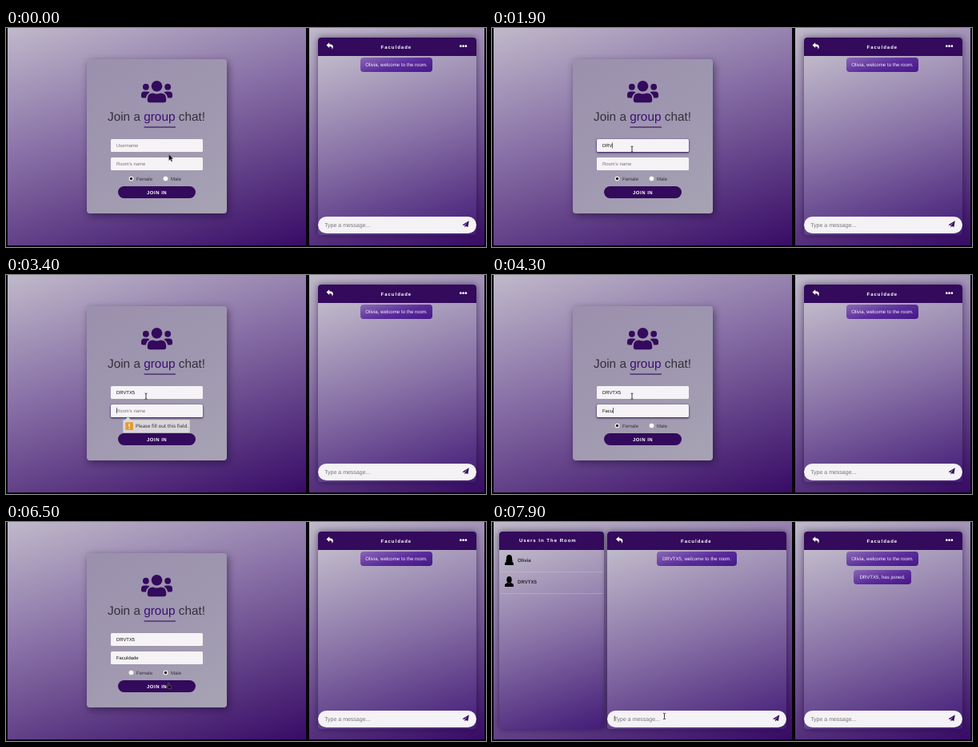
Write an HTML page that moves like this. It is 600 by 274 pixels and loops after 8000 ms.

```html
<!DOCTYPE html>
<html lang="en">
<head>
<meta charset="utf-8">
<title>Group chat</title>
<style>
  html, body { margin: 0; width: 100%; height: 100%; overflow: hidden; background: #08060b; }
  #stage { position: absolute; left: 0; top: 0; width: 600px; height: 274px; overflow: hidden; background: #08060b; }
  #stage div, svg { position: absolute; }
  .page { overflow: hidden; background: linear-gradient(162deg, #c0b9ca 0%, #8870a6 42%, #380b66 100%); }
  .card { border-radius: 4px; background: linear-gradient(150deg, #9b90ad, #9f97b0 50%, #a7a3b3); box-shadow: 2px 3px 10px rgba(20, 5, 40, .5); }
  .panel { border-radius: 4px; background: linear-gradient(162deg, #c9c5d0, #8871a6 52%, #431c77); box-shadow: 0 0 9px rgba(15, 0, 35, .55); }
  .head { border-radius: 4px 4px 0 0; background: #330a5c; }
  .field { border-radius: 1.5px; background: #f5f3f5; }
  .field.focus { box-shadow: 0 1px 2.5px #2b0a55, 0 0 1px #4a2a78; }
  .button { border-radius: 8px; background: #330a5c; }
  .pill { border-radius: 10.5px; background: #f4f2f4; }
  .bubble { border-radius: 4px; background: linear-gradient(165deg, #8a68b4, #5a2b9b 55%, #451787); }
  .line { background: rgba(205, 195, 215, .4); }
  .status { border-radius: 0 2px 0 0; background: #39343d; }
  svg { left: 0; top: 0; }
  text { font-family: "Liberation Sans", Arial, sans-serif; text-rendering: geometricPrecision; white-space: pre; }
  .title { font-size: 15.35px; fill: #35303a; }
  .small { font-size: 5.9px; fill: #77727c; }
  .typed { font-size: 5.9px; fill: #111; }
  .label { font-size: 6px; fill: #35303c; }
  .bold { font-size: 6px; font-weight: bold; fill: #fff; letter-spacing: 1px; }
  .join { letter-spacing: .5px; }
  .user { font-size: 6.1px; font-weight: bold; fill: #2c2633; }
  .hint { font-size: 7px; fill: #77727c; }
  .msg { font-size: 6.15px; fill: #f6f2fa; text-anchor: middle; }
  .system { font-family: "Noto Sans", "Open Sans", sans-serif; }
  .ink { fill: #330a5c; }
</style>
</head>
<body>
<div id="stage"></div>
<script>
(() => {
const LOOP = 8000;
const NAME = 'DRVTX5', FRIEND = 'Olivia', ROOM = 'Faculdade';
const stage = document.getElementById('stage');

function layer(x = 0, y = 0, w = 600, h = 274, cls = '', parent = stage) {
  const el = document.createElement('div');
  el.className = cls;
  el.style.cssText = `left:${x}px;top:${y}px;width:${w}px;height:${h}px`;
  return parent.appendChild(el);
}

const group = (parent = stage) => layer(0, 0, 600, 274, '', parent);

function draw(parent, markup) {
  parent.insertAdjacentHTML('beforeend', `<svg width="600" height="274" viewBox="0 0 600 274">${markup}</svg>`);
  return parent.lastElementChild;
}

const text = (x, y, cls, str, id = '') => `<text x="${x}" y="${y}" class="${cls}" data-id="${id}">${str}</text>`;
const at = (x, y, body, scale = 1) => `<g transform="translate(${x} ${y}) scale(${scale})">${body}</g>`;
const part = (svg, id) => svg.querySelector(`[data-id="${id}"]`);
const show = (el, on) => { el.style.display = on ? '' : 'none'; };

const REPLY = '<path fill="#fff" d="M0 3.6L4 0V2Q9.6 2 9 6.5Q8.8 8.3 7.6 9.2Q8.6 5.4 4 5.2V7.2Z"/>';
const PLANE = '<path class="ink" d="M0 5.4L9 0L7.5 8.4L4.6 7.2L3.2 9V6.5L7.2 2.2L2.3 6.3Z"/>';
const SIDE = '<circle cx="96" cy="160" r="64"/><path d="M64 256H128Q154 256 173 275Q108 312 98 384H32Q0 384 0 352V320Q0 256 64 256Z"/>';
const USERS = `<g class="ink">${SIDE}<g transform="translate(640 0) scale(-1 1)">${SIDE}</g>
  <circle cx="320" cy="144" r="112"/>
  <path d="M243 288Q320 320 397 288Q512 290 512 403V432Q512 480 464 480H176Q128 480 128 432V403Q128 290 243 288Z"/></g>`;
const BODY = '<path d="M0 13V11Q0 8.8 4 8L5.5 9L7 8Q11 8.8 11 11V13Z"/>';
const WOMAN = BODY + '<path d="M5.5 0Q9 0 9 4Q9 7 10 8.3Q5.5 9.8 1 8.3Q2 7 2 4Q2 0 5.5 0Z"/>';
const MAN = BODY + '<ellipse cx="5.5" cy="4.2" rx="3.2" ry="4.2"/>';

function chat(parent, x, w) {
  layer(x, 12, w, 247, 'panel', parent);
  layer(x, 12, w, 22.5, 'head', parent);
  layer(x, 236, w, 20.5, 'pill', parent);
  draw(parent, at(x + 11, 18.3, REPLY, .92) + at(x + w - 17, 241.3, PLANE, .92) +
    text(x + w / 2 - 20, 25.5, 'bold', ROOM) + text(x + 8.7, 248.6, 'hint', 'Type a message...'));
}

function bubble(parent, cx, y, w, str) {
  const holder = group(parent);
  layer(cx - w / 2, y, w, 18, 'bubble', holder);
  draw(holder, text(cx, y + 11, 'msg', str));
  return holder;
}

// Sign-in page
layer(2, 0, 373, 272, 'page');
const login = group();
layer(101, 39, 175, 193, 'card', login);
const fields = [139, 161.5].map(y => layer(131, y, 114.5, 16, 'field', login));
layer(140, 198, 97, 14.5, 'button', login);
const radio = cx => `<circle cx="${cx}" cy="188.5" r="3.3" fill="#fbfafb" stroke="#6d6576" stroke-width=".4"/>`;
const form = draw(login, at(169, 64, USERS, .061) +
  text(127, 116, 'title', 'Join a <tspan fill="#3c1072">group</tspan> chat!') +
  '<rect class="ink" x="172.5" y="123.5" width="39.5" height="1.1"/>' +
  text(138, 149.2, 'small', 'Username', 'hint0') + text(138, 149.2, 'typed', '', 'value0') +
  text(138, 171.6, 'small', "Room's name", 'hint1') + text(138, 171.6, 'typed', '', 'value1') +
  radio(156.5) + radio(199.5) + '<circle data-id="dot" cy="188.5" r="1.7" fill="#111"/>' +
  text(163, 190.7, 'label', 'Female') + text(206, 190.7, 'label', 'Male') +
  text(176, 207.5, 'bold join', 'JOIN IN') +
  `<g data-id="tip"><path fill="#d9d7da" stroke="#a29aac" stroke-width=".5" d="M147 181H149L152.5 177.3L156 181H229Q230 181 230 182V197.5H146V182Q146 181 147 181Z"/>
   <rect x="149.3" y="184.3" width="9.6" height="9.8" rx="1" fill="#e59a2e"/>
   <path d="M154.1 186V190M154.1 191.2V192.5" stroke="#fff" stroke-width="1.3"/>
   <text x="162" y="191.4" class="system" font-size="6.1" fill="#2d2a30">Please fill out this field.</text></g>`);
const hints = [part(form, 'hint0'), part(form, 'hint1')];
const values = [part(form, 'value0'), part(form, 'value1')];
const dot = part(form, 'dot'), tip = part(form, 'tip');

// Chat room
const room = group();
layer(9, 12, 131, 247, 'panel', room);
layer(9, 12, 131, 22.5, 'head', room);
draw(room, text(34, 25.3, 'bold', 'Users In The Room'));
chat(room, 144, 224);
const joined = group(room);
layer(10, 61.5, 129, 1, 'line', joined);
layer(10, 88.5, 129, 1, 'line', joined);
draw(joined, at(16, 41, WOMAN) + at(16, 68, MAN) +
  text(32, 49.8, 'user', FRIEND) + text(32, 77, 'user', NAME));
bubble(joined, 256, 37, 100, `${NAME}, welcome to the room.`);
const statusBar = group(room);
layer(2, 262.5, 122.5, 9.5, 'status', statusBar);
draw(statusBar, '<text x="4" y="269.7" class="system" font-size="6.45" fill="#b9b5bd">Waiting for group-chatting-x5.herok...</text>');

// Second window
layer(379, 0, 219, 272, 'page');
chat(stage, 389.5, 198);
draw(stage, [568.3, 571.6, 574.9].map(x => `<circle cx="${x}" cy="22.7" r="1.35" fill="#fff"/>`).join(''));
bubble(stage, 488, 37, 90.5, `${FRIEND}, welcome to the room.`);
const notice = bubble(stage, 488, 59.5, 71.5, `${NAME}, has joined.`);

// Caret and pointers
const overlay = draw(stage, `<rect data-id="caret" width=".6" height="7" fill="#111"/>
  <g data-id="pointer">
    <path data-id="arrow" d="M0 0V8L1.9 6.3L3.2 9.2L4.5 8.6L3.2 5.8H5.6Z" fill="#0b0810" stroke="#bdb5c5" stroke-width=".4"/>
    <path data-id="beam" d="M-1.5 -3.7Q0 -3.7 0 -2.7Q0 -3.7 1.5 -3.7M0 -2.7V2.7M-1.5 3.7Q0 3.7 0 2.7Q0 3.7 1.5 3.7" fill="none" stroke="#2a2630" stroke-width=".9"/>
    <path data-id="hand" d="M-.8 0Q0 -.7 .7 0V2.8L3 3.4Q3.6 3.7 3.4 4.6L2.8 7H-1L-2.6 4.4Q-2.3 3.6 -.8 4.6Z" fill="#0b0810" stroke="#d8d2de" stroke-width=".3"/>
  </g>`);
const caret = part(overlay, 'caret'), pointer = part(overlay, 'pointer');
const shapes = ['arrow', 'beam', 'hand'].map(id => [id, part(overlay, id)]);

// Time, x, y
const route = [[0, 203.5, 158], [400, 203.5, 158], [800, 175, 151.7], [5200, 175, 151.7], [5600, 201.5, 191],
  [6100, 201.5, 191], [6500, 203.5, 201.7], [7000, 203.5, 201.7], [7600, 215.5, 243], [LOOP, 215.5, 243]];
const nameKeys = [1700, 1800, 1900, 2000, 2100, 2400];
const roomKeys = [3900, 4100, 4200, 4300, 4400, 4500, 4600, 4700, 4800];
const caretOn = [[1000, 1400], [1700, 2700], [3300, 3700], [3900, 5300], [5800, 5900], [7700, LOOP]];

function mouse(t) {
  const i = route.findIndex(([time]) => time > t);
  const [t0, x0, y0] = route[i - 1], [t1, x1, y1] = route[i];
  const k = (t - t0) / (t1 - t0), ease = k * k * (3 - 2 * k);
  return [x0 + (x1 - x0) * ease, y0 + (y1 - y0) * ease];
}

function pointerShape(y, inRoom) {
  if (inRoom) return y > 236 ? 'beam' : 'arrow';
  if ((y > 139 && y < 155) || (y > 161.5 && y < 177.5)) return 'beam';
  return y > 185 ? 'hand' : 'arrow';
}

const within = (t, from, to) => t >= from && t < to;
const clamp = v => Math.max(0, Math.min(1, v));

function render(now) {
  const t = Math.floor((now % LOOP) / 100) * 100;
  const inRoom = t >= 6700, loaded = t >= 7100;
  show(login, !inRoom);
  show(room, inRoom);
  show(joined, loaded);
  show(notice, loaded);
  show(statusBar, !loaded);

  [[NAME, nameKeys], [ROOM, roomKeys]].forEach(([word, keys], i) => {
    const typed = word.slice(0, keys.filter(k => k <= t).length);
    values[i].textContent = typed;
    show(hints[i], !typed);
  });
  fields[0].classList.toggle('focus', within(t, 1000, 3300));
  fields[1].classList.toggle('focus', within(t, 3300, 5900));
  dot.setAttribute('cx', t < 5900 ? 156.5 : 199.5);
  tip.style.opacity = Math.min(clamp((t - 3200) / 200), clamp((4100 - t) / 200));

  const active = t < 3300 ? 0 : 1, value = values[active];
  const typedWidth = value.textContent && !inRoom ? value.getComputedTextLength() : 0;
  show(caret, caretOn.some(([a, b]) => within(t, a, b)));
  caret.setAttribute('x', inRoom ? 152.8 : 138 + typedWidth);
  caret.setAttribute('y', inRoom ? 242.3 : [143.5, 166][active]);

  const [x, y] = mouse(t), shape = pointerShape(y, inRoom);
  pointer.setAttribute('transform', `translate(${x} ${y})`);
  shapes.forEach(([id, el]) => show(el, id === shape));
}

const start = performance.now();
function tick() {
  render(Math.max(0, performance.now() - start));
  requestAnimationFrame(tick);
}
tick();
})();
</script>
</body>
</html>
```
